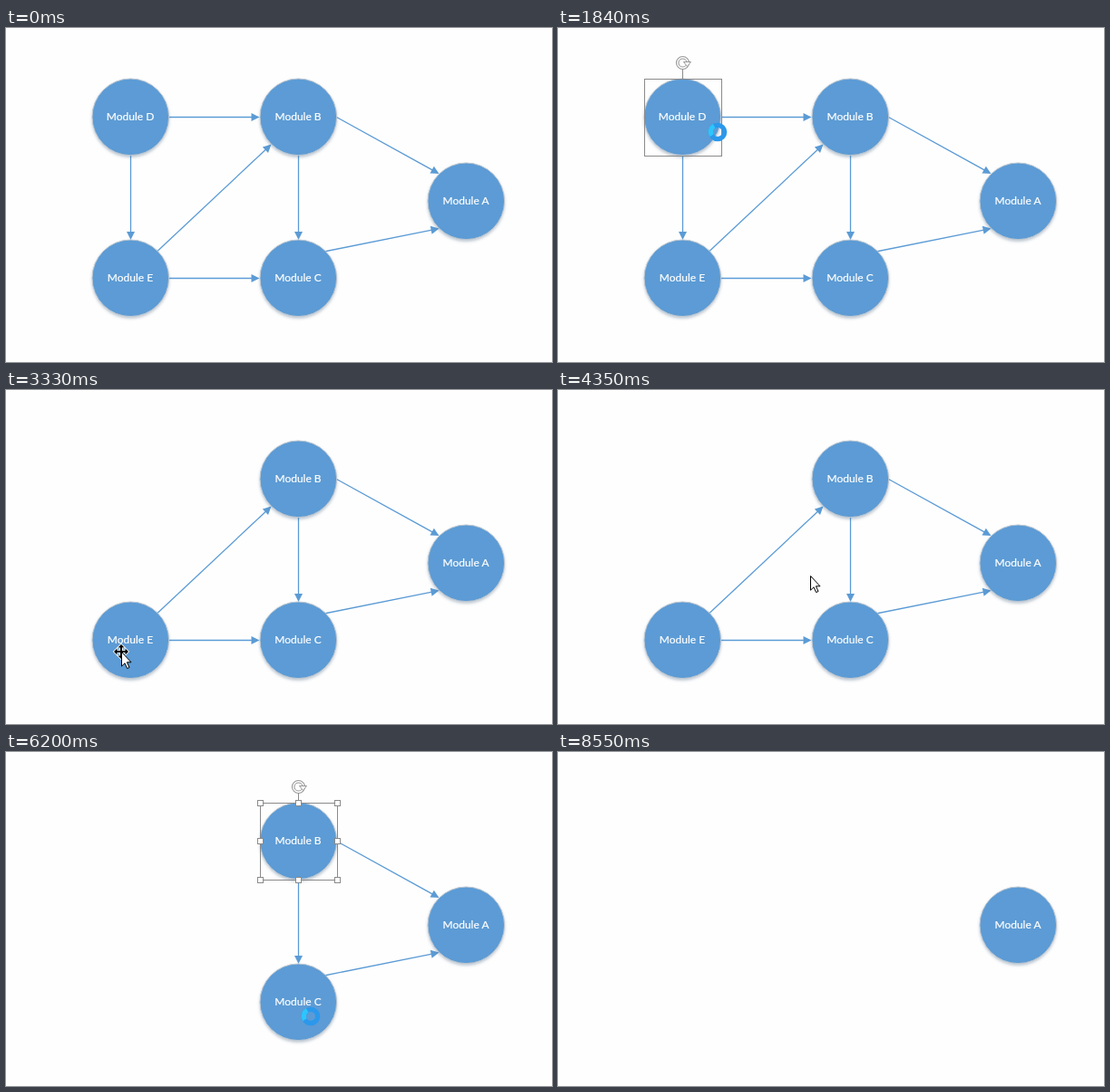
Recreate the animation shown at these times as an HTML page. Size 602 px wide and 369 px high, loop 9250 ms.

```html
<!DOCTYPE html>
<html lang="en">
<head>
<meta charset="utf-8">
<title>Module graph</title>
<style>
  html, body { margin: 0; width: 100%; height: 100%; overflow: hidden; background: #fefefe; }
  svg { display: block; }
  .node text { font: 12px Lato, "Open Sans", sans-serif; fill: #fff; stroke: #fff; stroke-width: .2; text-anchor: middle; }
  .node circle { fill: #5b9bd5; stroke: #bcc6d0; }
  .link line { stroke: #5b9bd5; stroke-width: 1.3; }
  .link path { fill: #5b9bd5; }
  .selection { fill: none; stroke: #8a8a8a; }
  .handles rect { fill: #fff; }
</style>
</head>
<body>
<svg id="stage" width="602" height="369" viewBox="0 0 602 369">
  <defs>
    <filter id="shadow" x="-20%" y="-20%" width="140%" height="140%">
      <feDropShadow dx="0" dy="2" stdDeviation="1.5" flood-color="#3c5878" flood-opacity=".32"/>
    </filter>
  </defs>
  <g id="links"></g>
  <g id="nodes"></g>
  <g id="selection" class="selection">
    <rect x="-42" y="-42" width="85" height="85"/>
    <path d="M0 -42V-54"/>
    <circle cy="-60" r="5.8" stroke="#999" stroke-width="3.6"/>
    <circle cy="-60" r="5.8" stroke="#fff" stroke-width="1.4"/>
    <path d="M1 -61H9L5 -56Z" fill="#fff" stroke="#999"/>
    <g id="handles" class="handles"></g>
  </g>
  <g id="cursor">
    <g id="wait" fill="none" stroke-width="5.2">
      <circle r="7.7" stroke="#2b98ec"/>
      <path id="glint" d="M7.7 0A7.7 7.7 0 0 1 0 7.7" stroke="#2cc6fc"/>
    </g>
    <path id="cross" fill="#000" stroke="#fff" stroke-width="1.6" paint-order="stroke"
      d="M0 -8L3.5 -4.5H1V-1H4.5V-3.5L8 0 4.5 3.5V1H1V4.5H3.5L0 8 -3.5 4.5H-1V1H-4.5V3.5L-8 0 -4.5 -3.5V-1H-1V-4.5H-3.5Z"/>
    <path id="arrow" fill="#fff" stroke="#000" d="M.5 .5V16.2L4 12.8 6.6 18.6 9 17.5 6.4 11.8H11Z"/>
  </g>
</svg>
<script>
const LOOP = 9250, STEP = 80;
const $ = id => document.getElementById(id);

// Each node: centre and the time it is deleted.
const nodes = {
  D: { x: 137, y: 98, gone: 2010 },
  B: { x: 322, y: 98, gone: 6360 },
  A: { x: 507, y: 191, gone: Infinity },
  E: { x: 137, y: 276, gone: 4580 },
  C: { x: 322, y: 276, gone: 7620 }
};

const links = [
  ["D", 180, 98.5, 279.5, 98.5],
  ["D", 137.5, 141, 137.5, 234],
  ["E", 167, 246.5, 292.5, 128.5],
  ["E", 180, 276.5, 279.5, 276.5],
  ["B", 322.5, 141, 322.5, 234],
  ["B", 364.5, 98.5, 477.5, 161],
  ["C", 351, 247, 477.5, 221.5]
];

// Node, time selected, time the handles hide.
const selections = [["D", 1520, 1840], ["B", 5430, 6280], ["C", 7150, 7450]];

// Start, cursor, position reached, and the end time if it takes several steps.
const moves = [
  [0, "none", 436, 330],
  [70, "arrow", 436, 330],
  [130, "arrow", 60, 95, 190],
  [360, "arrow", 142, 82, 440],
  [590, "move", 142, 82],
  [820, "move", 132, 88, 970],
  [1050, "move", 177, 101, 1290],
  [1370, "arrow", 188, 104],
  [1750, "arrow", 182, 110],
  [1840, "wait", 176, 115],
  [2400, "arrow", 271, 190, 2560],
  [2640, "arrow", 140, 289, 2870],
  [2950, "move", 111, 309],
  [3100, "move", 127, 289, 3330],
  [3880, "move", 152, 275],
  [3960, "arrow", 329, 177, 4430],
  [4580, "arrow", 317, 145, 4730],
  [4810, "move", 310, 129],
  [4880, "move", 331, 99, 4950],
  [5120, "move", 331, 97],
  [5430, "move", 331, 125],
  [5510, "arrow", 335, 232, 5740],
  [5820, "move", 336, 292, 5900],
  [6200, "wait", 336, 292],
  [6520, "move", 336, 292],
  [7150, "move", 350, 289],
  [7230, "arrow", 500, 262, 7380],
  [7450, "wait", 506, 261],
  [7620, "arrow", 507, 261],
  [7930, "arrow", 507, 245],
  [8005, "move", 507, 229],
  [8080, "arrow", 564, 346, 8155],
  [8230, "none", 569, 361],
  [8400, "arrow", 569, 361],
  [8475, "arrow", 569, 364],
  [8550, "none", 569, 364]
];

function linkMarkup([from, x1, y1, x2, y2]) {
  const angle = Math.atan2(y2 - y1, x2 - x1);
  const bx = x2 - 8 * Math.cos(angle), by = y2 - 8 * Math.sin(angle);
  return `<g class="link" data-node="${from}">
    <line x1="${x1}" y1="${y1}" x2="${bx}" y2="${by}"/>
    <path d="M0 0L-9 -4.5V4.5Z" transform="translate(${x2} ${y2}) rotate(${angle * 180 / Math.PI})"/></g>`;
}

function nodeMarkup([name, { x, y }]) {
  return `<g class="node" data-node="${name}" transform="translate(${x} ${y})">
    <circle cx=".3" cy=".3" r="42.3" filter="url(#shadow)"/>
    <text y="4">Module ${name}</text></g>`;
}

function handlesMarkup() {
  const sides = [-42, 0, 43];
  return sides.flatMap(x => sides.filter(y => x || y)
    .map(y => `<rect x="${x - 3}" y="${y - 3}" width="6" height="6"/>`)).join("");
}

$("links").innerHTML = links.map(linkMarkup).join("");
$("nodes").innerHTML = Object.entries(nodes).map(nodeMarkup).join("");
$("handles").innerHTML = handlesMarkup();
const parts = [...document.querySelectorAll("[data-node]")];

const show = (el, visible) => el.setAttribute("visibility", visible ? "inherit" : "hidden");
const place = (el, x, y) => el.setAttribute("transform", `translate(${x} ${y})`);

function cursorAt(t) {
  const i = moves.findLastIndex(m => m[0] <= t);
  const [start, kind, x, y, end = start] = moves[i];
  const [, , x0, y0] = moves[Math.max(0, i - 1)];
  const steps = Math.round((end - start) / STEP) + 1;
  const gap = (end - start) / (steps - 1) || 1;
  const k = Math.min(steps, Math.floor((t - start) / gap) + 1) / steps;
  return { kind, x: Math.round(x0 + (x - x0) * k), y: Math.round(y0 + (y - y0) * k), start };
}

function draw(t) {
  for (const part of parts) show(part, t < nodes[part.dataset.node].gone);

  const active = selections.find(([name, from]) => t >= from && t < nodes[name].gone);
  show($("selection"), active);
  if (active) {
    const { x, y } = nodes[active[0]];
    place($("selection"), x + .5, y + .5);
    show($("handles"), t < active[2]);
  }

  const { kind, x, y, start } = cursorAt(t);
  place($("cursor"), x, y);
  show($("arrow"), kind === "arrow" || kind === "move");
  show($("cross"), kind === "move");
  show($("wait"), kind === "wait");
  const turn = Math.floor((t - start) / STEP) * 30;
  $("glint").setAttribute("transform", `rotate(${150 + turn})`);
}

const origin = performance.now();
function tick() {
  draw((performance.now() - origin) % LOOP);
  requestAnimationFrame(tick);
}
tick();
</script>
</body>
</html>
```
